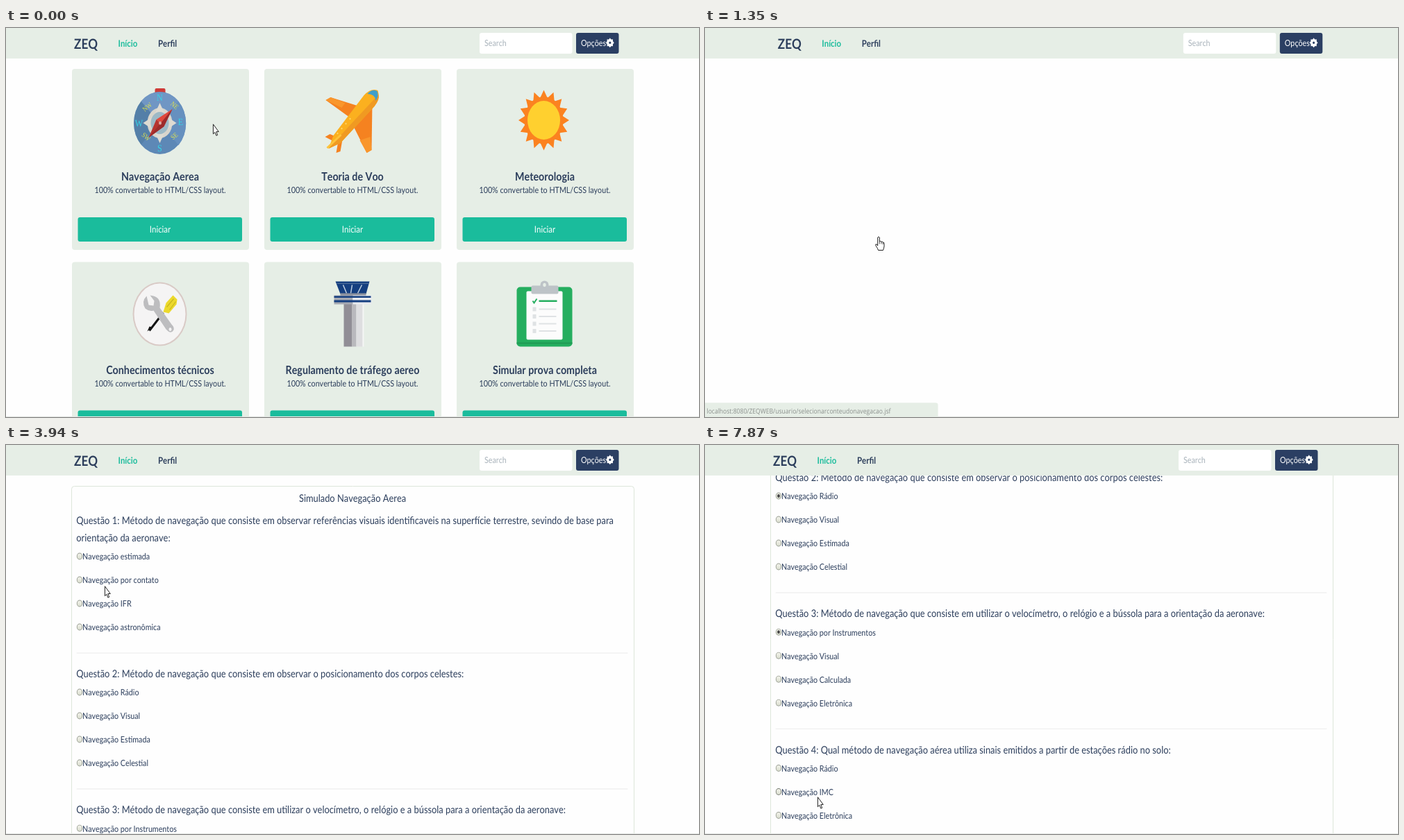
An HTML page with a canvas for the animation above (8000 ms loop, 998x561 px).

```html
<!DOCTYPE html>
<html lang="pt">
<head>
<meta charset="utf-8">
<title>Simulado</title>
<style>
html, body { margin: 0; width: 100%; height: 100%; overflow: hidden; background: #fefefe; }
canvas { display: block; width: 998px; height: 561px; }
</style>
</head>
<body>
<canvas id="stage" width="998" height="561"></canvas>
<script>
const ctx = document.getElementById('stage').getContext('2d');
const W = 998, H = 561, LOOP = 8000;
const SX = 0.714, SY = 0.83;
const INK = '#2c3e5c', PALE = '#e6eee6', GREEN = '#1abc9c', NAVY = '#2b3f63';
const BRAND = 'ZEQ';
const LINK = `localhost:8080/${BRAND}WEB/usuario/selecionarconteudonavegacao.jsf`;

const TILES = [
  ['Navegação Aerea', compass], ['Teoria de Voo', plane], ['Meteorologia', sun],
  ['Conhecimentos técnicos', tools], ['Regulamento de tráfego aereo', tower],
  ['Simular prova completa', clipboard]
];
const TOPICS = ['Métodos de navegação', 'A terra e a navegação aérea',
  'Orientação sobre a superfície da terra', 'Unidades de medida', 'Mapas e cartas',
  'Tempo e fusos horários', 'Magnetismo terrestre'];
const METHOD = 'Método de navegação que consiste em ';
const QUESTIONS = [
  { y: 134.5, ask: METHOD + 'observar referências visuais identificaveis na superfície terrestre, sevindo de base para',
    more: 'orientação da aeronave:', options: ['estimada', 'por contato', 'IFR', 'astronômica'], pick: 4530 },
  { y: 330.5, ask: METHOD + 'observar o posicionamento dos corpos celestes:',
    options: ['Rádio', 'Visual', 'Estimada', 'Celestial'], pick: 5740 },
  { y: 526.7, ask: METHOD + 'utilizar o velocímetro, o relógio e a bússola para a orientação da aeronave:',
    options: ['por Instrumentos', 'Visual', 'Calculada', 'Eletrônica'], pick: 6870 },
  { y: 723, ask: 'Qual método de navegação aérea utiliza sinais emitidos a partir de estações rádio no solo:',
    options: ['Rádio', 'IMC', 'Eletrônica'], pick: Infinity }
];

// time, x, y of the pointer tip
const POINTER = [
  [430, 298, 138], [1220, 250, 301], [1610, 250, 301], [2010, 130, 103], [2240, 130, 103],
  [2440, 146, 200], [2740, 141, 361], [2890, 139, 350], [3640, 139, 350], [3940, 142, 203],
  [4400, 140, 160], [4530, 140, 160], [5300, 146, 388], [5360, 146, 388], [5480, 135, 356],
  [5760, 135, 356], [6180, 150, 425], [6440, 150, 425], [6620, 155, 461], [6870, 155, 461],
  [7290, 154, 464], [7500, 154, 464], [7520, 154, 467], [7690, 154, 467], [7870, 162, 507]
];
const SCROLL = [[5740, 0], [6180, 94.3], [6870, 94.3], [7290, 283]];

const clamp = v => Math.max(0, Math.min(1, v));
const smooth = v => v * v * (3 - 2 * v);

function track(keys, t, ease = v => v) {
  const next = keys.findIndex(k => k[0] > t);
  if (next === 0) return keys[0].slice(1);
  if (next < 0) return keys[keys.length - 1].slice(1);
  const a = keys[next - 1], b = keys[next];
  const u = ease((t - a[0]) / (b[0] - a[0]));
  return a.slice(1).map((v, i) => v + (b[i + 1] - v) * u);
}

function text(s, x, y, size, color = INK, { weight = 400, align = 'left', font = 'Lato, sans-serif' } = {}) {
  ctx.save();
  ctx.translate(x, y);
  ctx.scale(SX, SY);
  ctx.font = `${weight} ${size}px ${font}`;
  // Fractional advances without kerning, as on the recorded page.
  ctx.textRendering = 'geometricPrecision';
  ctx.fontKerning = 'none';
  ctx.textAlign = align;
  ctx.fillStyle = color;
  ctx.fillText(s, 0, 0);
  ctx.restore();
}

function rect(x, y, w, h, color, r = 0) {
  ctx.fillStyle = color;
  ctx.beginPath();
  ctx.roundRect(x, y, w, h, r);
  ctx.fill();
}

function oval(x, y, rx, ry, color) {
  ctx.fillStyle = color;
  ctx.beginPath();
  ctx.ellipse(x, y, rx, ry, 0, 0, 7);
  ctx.fill();
}

function path(d, fill, stroke, width = 1) {
  const p = new Path2D(d);
  if (fill) { ctx.fillStyle = fill; ctx.fill(p); }
  if (stroke) { ctx.strokeStyle = stroke; ctx.lineWidth = width; ctx.stroke(p); }
}

function star(points, rx, ry, inner, color) {
  ctx.fillStyle = color;
  ctx.beginPath();
  for (let i = 0; i < points * 2; i++) {
    const a = i * Math.PI / points - Math.PI / 2, k = i % 2 ? inner : 1;
    ctx.lineTo(Math.cos(a) * rx * k, Math.sin(a) * ry * k);
  }
  ctx.fill();
}

function vertical(y0, y1, from, to) {
  const g = ctx.createLinearGradient(0, y0, 0, y1);
  g.addColorStop(0, from);
  g.addColorStop(1, to);
  return g;
}

/* Icons, each drawn around its own centre */

function compass() {
  rect(-7, -46, 15, 10, '#cf3b37', 2);
  oval(0, 4, 37.5, 45, '#5d88b6');
  path('M0 4L-27 -27A37.5 45 0 0 1 27 -27Z', '#7096c4');
  path('M0 4L27 -27A37.5 45 0 0 1 27 36Z', '#6690bf');
  path('M0 4L-27 35A37.5 45 0 0 1 -27 -27Z', '#547fa8');
  oval(0, 4, 18, 22, '#d8d5cc');
  ctx.save();
  ctx.translate(0, 4);
  star(4, 24, 29, .5, '#dedbd2');
  ctx.restore();
  oval(0, 4, 13, 16, '#9db9c6');
  path('M18 -16L6 9L-5 -1Z', '#e0483c');
  path('M-16 25L6 9L-5 -1Z', '#b6332f');
  path('M18 -16L-16 25L6 9Z', '#9c2b2b');
  oval(.5, 4, 2, 2.5, '#d9aaa2');
  const serif = { align: 'center', font: 'Liberation Serif, serif' };
  [['N', 0, -28], ['S', 0, 45], ['W', -30, 9], ['E', 30, 7]].forEach(([s, x, y]) => text(s, x, y, 17, '#35d5e6', serif));
  [['NW', -18, -19, -.7], ['NE', 21, -21, .7], ['SE', 21, 23, -.7], ['SW', -20, 24, .7]].forEach(([s, x, y, a]) => {
    ctx.save();
    ctx.translate(x, y);
    ctx.rotate(a);
    text(s, 0, 3, 12, '#e0e34b', serif);
    ctx.restore();
  });
}

function plane() {
  path('M-38 -29L-31 -33L17 -18L2 0Z', '#f58220');
  path('M29 -25L28 43L21 47L3 11Z', '#f58220');
  path('M-39 24L-32 20L-15 27L-20 34ZM-20 30L-14 28L-17 45L-23 47Z', '#f58220');
  path('M-38 -29L-31 -33L-10 -25L-15 -18ZM28 43L21 47L11 29L26 24Z', '#f9962c');
  path('M-34 41L-27 22L17 -36Q27 -47 37 -43Q41 -32 32 -20L-17 33Z', '#fbb01f');
  path('M-34 41L-4 8L38 -37Q40 -30 32 -20L-17 33Z', '#f09a22');
  path('M22 -38Q29 -46 36 -42Q39 -36 34 -28Q33 -38 22 -38Z', '#3f9fca');
  path('M-36 40L-16 21', null, '#fdc33b', 3);
  for (let i = 0; i < 4; i++) oval(-21 + i * 6, 19 - i * 7, 1, 1.2, '#ffd667');
}

function sun() {
  ctx.save();
  ctx.translate(-1, 0);
  star(16, 36.5, 43.5, .75, '#fb8220');
  oval(0, 0, 28, 34, '#fb8220');
  oval(0, 0, 23.5, 28, '#ffd02f');
  ctx.restore();
}

function tools() {
  oval(0, 1, 39, 46, '#d9cac6');
  oval(0, 1, 37, 44, '#f5f4f4');
  path('M-15 25L5 -1', null, '#151515', 3);
  path('M-18 26L-15 19L-10 20Z', '#151515');
  path('M5 -2L9 -15L19 -26L25 -20L24 -13L13 0Z', '#ecd92c');
  path('M10 -9L20 -21M14 -5L23 -17', null, '#c9b71f', 1.2);
  path('M-19 -25Q-27 -17 -21 -7Q-15 -2 -9 -4L9 23Q16 31 20 24Q21 20 17 16L0 -8Q2 -22 -9 -25L-14 -26L-8 -18L-9 -11L-16 -12Z', '#bdbdbf');
  oval(15, 23, 2, 2.5, '#f5f4f4');
}

function tower() {
  rect(-12, -15, 12, 63, '#918e96');
  rect(0, -15, 6, 63, '#b9b9bd');
  rect(6, -15, 9, 63, '#dedee0');
  rect(15, -15, 2, 63, '#f5f5f5');
  path('M-24 -46H25L20 -28H-17Z', '#153f80');
  path('M-22 -43H24', null, '#56749f', 1);
  path('M-13 -41L-8 -29M0 -41L-2 -29M14 -41L8 -29', null, '#c2d0e0', 1.5);
  rect(-17, -29, 37, 4, '#8b919e');
  rect(-26, -26, 27, 13, '#a6a9b2');
  rect(1, -26, 27, 13, '#e8eaee');
  rect(-26, -25, 53, 2.5, '#153f80');
  rect(-26, -19, 53, 3, '#153f80');
}

function clipboard() {
  rect(-40, -38, 80, 86, '#25ae5f', 5);
  path('M-40 43H40', null, '#219a55', 2);
  rect(-26, -32, 52, 70, '#fcfcfc', 2);
  oval(0, -41, 6, 6, '#bdc3c7');
  rect(-19, -40, 39, 12, '#bdc3c7', 2);
  oval(0, -41, 2.2, 2.8, PALE);
  path('M-17 -18L-15 -15L-11 -21', null, '#25ae5f', 2);
  rect(-8, -19, 26, 2.5, '#25ae5f');
  for (let y = -9; y < 30; y += 10.5) {
    rect(-17, y, 5, 6, '#dfe2e4');
    rect(-8, y + 2, 25, 2, '#dfe2e4');
  }
}

/* Page parts */

function navbar(shift) {
  rect(0, 0, W, 44, PALE);
  ctx.save();
  ctx.translate(shift, 0);
  text(BRAND, 98, 29.5, 24, INK, { weight: 700 });
  text('Início', 161.5, 27, 16, GREEN, { weight: 700 });
  text('Perfil', 219, 27, 16, INK, { weight: 700 });
  rect(682, 7, 133.5, 30, '#fff', 3);
  text('Search', 689, 26, 15, '#a9b3bb');
  rect(821, 7, 61.5, 30, NAVY, 3);
  text('Opções', 828, 26, 15, '#fff');
  ctx.translate(869.8, 21.3);
  star(8, 6, 7, .72, '#fff');
  oval(0, 0, 4.7, 5.4, '#fff');
  oval(0, 0, 1.5, 1.8, NAVY);
  ctx.restore();
}

function home(hovered) {
  TILES.forEach(([title, icon], i) => {
    const x = 95 + (i % 3) * 277, y = i < 3 ? 59 : 337.5, mid = x + 127;
    rect(x, y, 255, 261, PALE, 4);
    ctx.save();
    ctx.translate(mid - .5, y + 74);
    icon();
    ctx.restore();
    text(title, mid, y + 161, 20, INK, { weight: 700, align: 'center' });
    text('100% convertable to HTML/CSS layout.', mid, y + 179, 15, INK, { align: 'center' });
    rect(x + 8.5, y + 214, 236.5, 35, hovered && i === 0 ? '#3ec7ae' : GREEN, 3);
    text('Iniciar', mid, y + 236, 16, '#fff', { align: 'center' });
  });
}

function topics(checked, hovered) {
  text('Selecione os assuntos do simulado:', 100, 78, 15);
  TOPICS.forEach((topic, i) => {
    const y = 104 + i * 33.95;
    rect(100.5, y - 4.5, 7.5, 8.5, '#a3a79f', 1.5);
    rect(101.4, y - 3.6, 5.7, 6.7, vertical(y - 4, y + 3, '#f3f5ee', '#d5ddcf'), 1);
    if (checked && i === 0) path('M102 102.8L103.6 105.5L107 99.6', null, '#333', 1.7);
    text(topic, 109, y + 4, 15);
  });
  rect(100, 327, 84, 34, hovered ? '#777' : '#999', 1);
  rect(101, 328, 82, 32, vertical(328, 360, '#f4f6f2', hovered ? '#efe2d9' : '#e2e2dc'));
  text('Iniciar simulado', 105.5, 347.5, 15);
}

function quiz(t, px, py) {
  const [scroll] = track(SCROLL, t, smooth);
  ctx.save();
  ctx.translate(0, -scroll);
  ctx.beginPath();
  ctx.roundRect(94.5, 59.5, 810, 1100, 4);
  ctx.strokeStyle = '#dde6da';
  ctx.lineWidth = 1;
  ctx.stroke();
  text('Simulado Navegação Aerea', 499, 81.5, 18, INK, { align: 'center' });
  QUESTIONS.forEach(({ y, ask, more, options, pick }, n) => {
    text(`Questão ${n + 1}: ${ask}`, 101.3, more ? y - 20.8 : y + 4.7, 18);
    if (more) text(more, 101.3, y + 4.7, 18);
    options.forEach((option, i) => {
      const oy = y + 26.5 + i * 34;
      const hot = px > 101 && px < 210 && Math.abs(py + scroll - oy) < 7;
      oval(106, oy - .5, 4.2, 5, hot ? '#777b72' : '#999e93');
      oval(106, oy - .5, 3.3, 4.1, vertical(oy - 5, oy + 4, '#f4f4ec', '#d8dccd'));
      if (i === 0 && t >= pick) oval(106, oy - .5, 1.9, 2.4, '#444');
      text('Navegação ' + option, 110, oy + 4.3, 15);
    });
    rect(101.5, y + 165, 794, 1, '#ececec');
  });
  ctx.restore();
}

function statusBar(alpha) {
  ctx.globalAlpha = alpha;
  rect(0, 540.5, 335.5, 21, PALE, [0, 3, 0, 0]);
  text(LINK, 2.5, 555.5, 12, '#8b908d', { font: 'Open Sans, sans-serif' });
  ctx.globalAlpha = 1;
}

function pointer(x, y, hand) {
  ctx.save();
  ctx.translate(x, y);
  ctx.lineJoin = 'round';
  if (hand) {
    path('M-1.3 1Q0 -1 1.3 1V7Q3 5.6 4 7.4Q5.5 6.3 6.3 8.2Q8 7.4 8 10V14Q7.5 17 6.5 19.5H-.5Q-1 17 -4.3 12.5Q-4.6 10 -2.7 11L-1.3 13Z', '#fff', '#222');
    path('M1.3 7V10.5M4 7.5V10.5M6.3 8.3V11', null, '#222', .8);
  } else {
    path('M.4 .8V14.8L2.9 12.4L4.9 17.2L6.7 16.3L4.8 11.6H8.3Z', '#fff', '#222');
  }
  ctx.restore();
}

function draw(t) {
  const [x, y] = track(POINTER, t);
  const page = t < 1350 ? 'home' : t < 1380 ? 'blank' : t < 3220 ? 'topics' : t < 3250 ? 'blank' : 'quiz';
  const onStart = page === 'home' && y > 273;
  const onSubmit = page === 'topics' && x > 100 && x < 184 && y > 327;
  rect(0, 0, W, H, '#fefefe');
  if (page === 'home') home(onStart);
  if (page === 'topics') topics(t >= 2130, onSubmit);
  if (page === 'quiz') quiz(t, x, y);
  navbar(page === 'home' || page === 'quiz' ? 0 : 6.8);
  rect(0, 560, W, 1, '#e6e9e6');
  const status = t < 1500 ? clamp((t - 1160) / 120) : clamp((1760 - t) / 120);
  if (status > 0) statusBar(status);
  const hand = onStart || onSubmit || (t >= 1350 && t < 1410) || (t >= 3220 && t < 3380);
  pointer(x, y, hand);
}

function frame() {
  draw(performance.now() % LOOP);
  requestAnimationFrame(frame);
}
frame();
</script>
</body>
</html>
```
